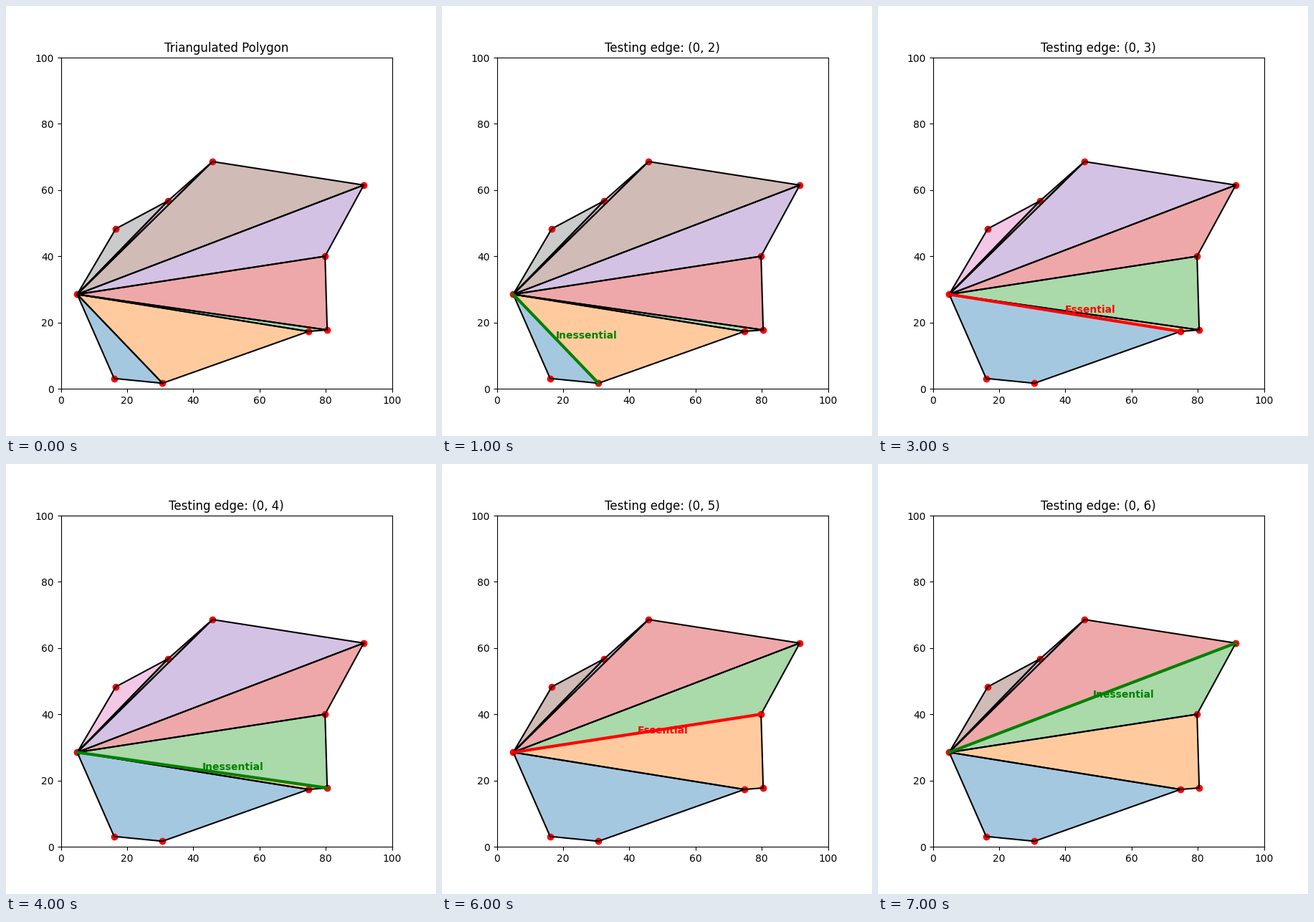
Recreate the animation shown at these times as a matplotlib script. Size 600 by 600 pixels, loop 8 s.

```python
import matplotlib.pyplot as plt
from matplotlib.animation import FuncAnimation
from matplotlib.patches import Polygon

POINTS = [(4.95, 28.5), (16.1, 3.1), (30.7, 1.65), (74.8, 17.3), (80.45, 17.75),
          (79.8, 40.0), (91.5, 61.5), (45.8, 68.6), (32.4, 56.75), (16.6, 48.3)]
COLORS = plt.get_cmap("tab10").colors
SCENE_COUNT = 8


def is_convex(a, b, c):
    (ax_, ay), (bx, by), (cx, cy) = POINTS[a], POINTS[b], POINTS[c]
    return (bx - ax_) * (cy - by) - (by - ay) * (cx - bx) > 0


def build_scenes():
    """List (title, polygons, tested vertex, inessential) for each step."""
    polys = [[0, k, k + 1] for k in range(1, len(POINTS) - 1)]
    scenes = [("Triangulated Polygon", polys, None, False)]
    step = 0
    for k in range(2, len(POINTS) - 1):
        i = next(n for n, p in enumerate(polys) if p[-1] == k)
        left, right = polys[i], polys[i + 1]
        removable = is_convex(left[-2], k, right[2])
        scenes.append((f"Testing edge: (0, {k})", polys, k, removable))
        if removable:
            step += 1
            polys = polys[:i] + [left + right[2:]] + polys[i + 2:]
            title = f"Step {step}: merged (Inessential edge)"
            scenes.append((title, polys, k, True))
    return scenes[:SCENE_COUNT]


SCENES = build_scenes()
fig, ax = plt.subplots(figsize=(6, 6), dpi=100)


def draw(frame):
    title, polys, k, removable = SCENES[frame]
    ax.clear()
    ax.set_xlim(0, 100)
    ax.set_ylim(0, 100)
    ax.set_aspect("equal")
    ax.set_title(title)

    for n, poly in enumerate(polys):
        corners = [POINTS[v] for v in poly]
        ax.add_patch(Polygon(corners, facecolor=COLORS[n], edgecolor="none", alpha=0.4))
        ax.plot(*zip(*corners, corners[0]), color="black", lw=1.5)
    ax.scatter(*zip(*POINTS), color="red", s=36, zorder=1)

    if k is not None:
        (x0, y0), (x1, y1) = POINTS[0], POINTS[k]
        color = "green" if removable else "red"
        label = "Inessential" if removable else "Essential"
        ax.plot([x0, x1], [y0, y1], color=color, lw=3)
        ax.text((x0 + x1) / 2, (y0 + y1) / 2, label,
                color=color, fontsize=10, weight="bold")
    return []


anim = FuncAnimation(fig, draw, frames=SCENE_COUNT, interval=1000,
                     init_func=lambda: draw(0), repeat=True)
plt.show()
```
